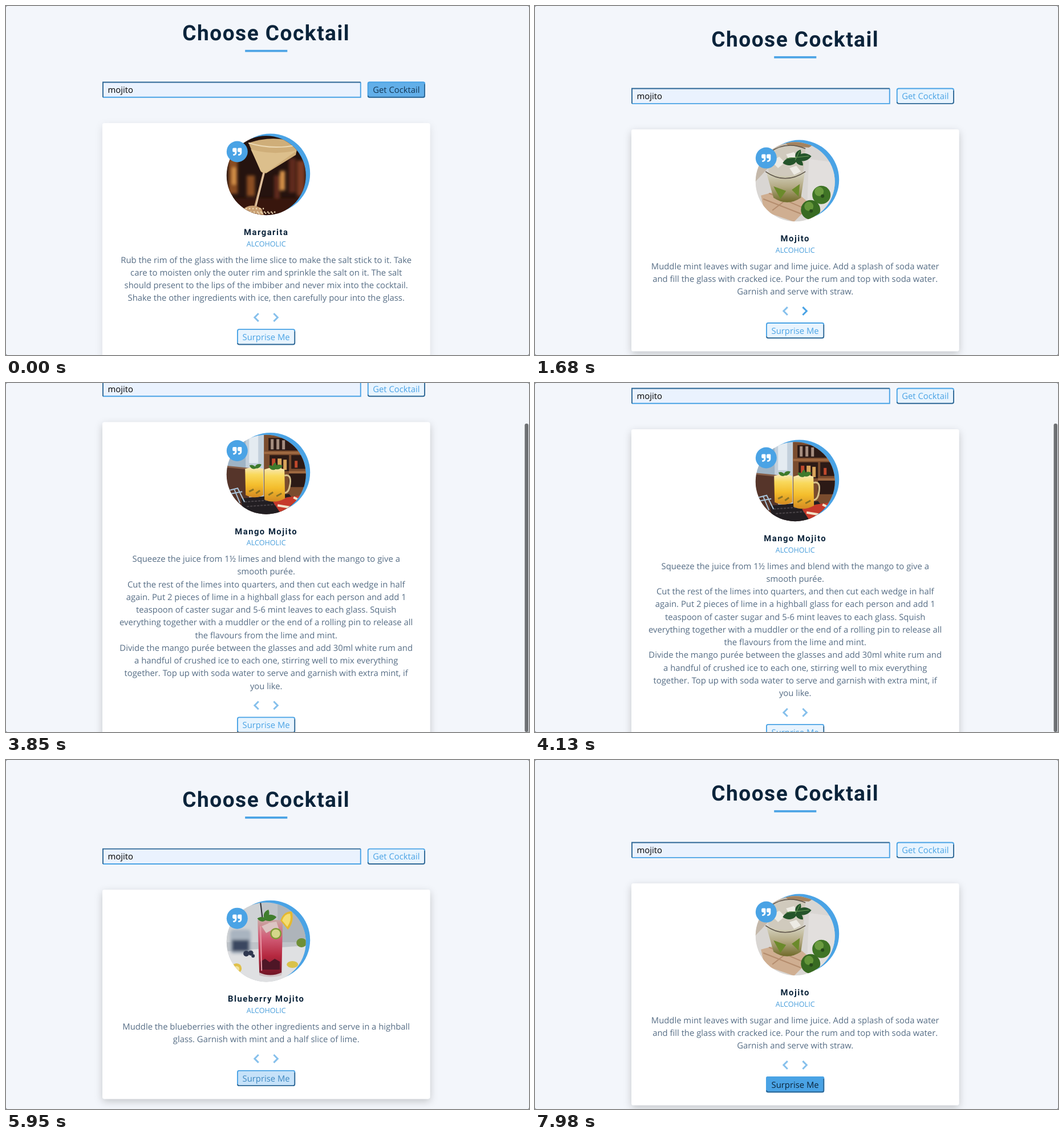
Recreate the animation shown at these times as an HTML page. Size 917 px wide and 611 px high, loop 8 s.

```html
<!DOCTYPE html>
<html lang="en">
<head>
<meta charset="utf-8">
<title>Choose Cocktail</title>
<style>
html, body { margin: 0; width: 100%; height: 100%; overflow: hidden; background: #f3f6fb; }
svg { display: block; width: 917px; height: 611px; }
text { font: 14.83px "Open Sans", sans-serif; white-space: pre; text-rendering: geometricPrecision; }
.mid { text-anchor: middle; }
.head { font-family: Roboto, sans-serif; font-weight: 700; letter-spacing: 1.48px; fill: #0b243b; }
.big { font-size: 37.06px; }
.kind { font-size: 12.6px; fill: #4a9fdc; }
.info { fill: #566d85; }
.line { fill: none; stroke-width: 1.9; }
.lite { stroke: #4aa3e5; }
.dark { stroke: #2d6795; }
.chev { fill: none; stroke: #86c0ec; stroke-width: 3; }
</style>
</head>
<body>
<svg viewBox="0 0 917 611">
  <defs>
    <clipPath id="disc"><circle r="69.5"/></clipPath>
    <filter id="shade" x="-10%" y="-10%" width="120%" height="120%">
      <feDropShadow id="drop" dx="0" dy="4.6" stdDeviation="6.9" flood-color="#000" flood-opacity=".1"/>
    </filter>
    <filter id="soft"><feGaussianBlur stdDeviation="2.5"/></filter>
    <linearGradient id="mango" x2="0" y2="1">
      <stop stop-color="#f8e9bd"/><stop offset=".25" stop-color="#f9d95c"/>
      <stop offset=".6" stop-color="#f4bd2c"/><stop offset="1" stop-color="#d38a22"/>
    </linearGradient>
    <linearGradient id="berry" x2="0" y2="1">
      <stop stop-color="#c9a9a4"/><stop offset=".3" stop-color="#d2607a"/>
      <stop offset=".65" stop-color="#b5283f"/><stop offset="1" stop-color="#6d1424"/>
    </linearGradient>
    <linearGradient id="lime" x2="0" y2="1">
      <stop stop-color="#d9d7c6"/><stop offset=".5" stop-color="#b3a983"/><stop offset="1" stop-color="#6f6a28"/>
    </linearGradient>
    <path id="leaf" d="M0 0C3-9 14-11 22-4C16 4 7 5 0 0Z"/>
    <path id="mark" d="M6 0H2A2 2 0 0 0 0 2V5.5A2 2 0 0 0 2 7.3H4.1V8.6A1.9 1.9 0 0 1 2.2 10.7H1.7A.8.8 0 0 0 1 11.5V12.7A.8.8 0 0 0 1.8 13.5A5.2 5.2 0 0 0 7.2 8.5V1.6A1.6 1.6 0 0 0 6 0Z"/>
  </defs>
  <rect width="917" height="611" fill="#7d858e"/>
  <rect width="917" height="611" rx="3" fill="#f3f6fb"/>

  <g id="page">
    <text class="mid head big" x="456.2" y="60.3">Choose Cocktail</text>
    <rect x="419.2" y="76.8" width="74.1" height="3.7" fill="#4aa3e5"/>
    <g id="field"></g>
    <text x="178.4" y="152.2">mojito</text>
    <g id="get"></g>
    <rect id="card" x="169" y="204.9" width="574.5" height="410" rx="3.7" fill="#fff" filter="url(#shade)"/>
    <circle cx="463.7" cy="293" r="69.5" fill="#4aa3e5"/>
    <g transform="translate(456.2 296.7)" clip-path="url(#disc)">
      <g class="photo">
        <rect x="-70" y="-70" width="140" height="140" fill="#25130f"/>
        <g filter="url(#soft)">
          <path d="M-66-30h16v62h-16zM-34 0h14v36h-14z" fill="#8a4d22"/>
          <path d="M-60-14h7v30h-7zM24-8h9v34h-9z" fill="#d69248"/>
          <path d="M14 0h10v44h-10zM40-30h12v60h-12z" fill="#5e2a1b"/>
          <path d="M54-26h14v62h-14z" fill="#7c3a24"/>
          <path d="M-70 40h140v30h-140z" fill="#38190f"/>
        </g>
        <path d="M-31-57Q12-72 56-57L52-36L0-4Q-8-4-10-8Z" fill="#cfae79"/>
        <path d="M-27-46Q12-34 54-44L0-5Q-8-5-10-9Z" fill="#dcbf8c"/>
        <path d="M-31-57Q12-44 56-54" fill="none" stroke="#ecd9b4" stroke-width="2"/>
        <path d="M-4-5Q-12 26-19 54" fill="none" stroke="#c9a27a" stroke-width="4"/>
        <path d="M-4-5Q-11 26-18 54" fill="none" stroke="#f2dfc4" stroke-width="1.2"/>
        <path d="M-44 62Q-28 46-8 58L-4 70H-44Z" fill="#c99f72"/>
        <path d="M-36 58h34M-28 64h44M-14 66h30" stroke="#f0dcb8" stroke-width="2.5" stroke-dasharray="2 4"/>
      </g>
      <g class="photo">
        <rect x="-70" y="-70" width="140" height="140" fill="#d9d6d3"/>
        <path d="M-70-70H20L-14-60L-70 0Z" fill="#c4b8aa"/>
        <path d="M-20-70H40L24-60L-10-62Z" fill="#a5835f"/>
        <path d="M24-40L70-34V70H20Z" fill="#e2dfdd"/>
        <path d="M-60 24L-8 10L28 40L-2 70L-54 52Z" fill="#cfae91"/>
        <path d="M-56 30L10 56M-46 20L20 48M-40 50L4 16" stroke="#b58d6e" stroke-width="2"/>
        <path d="M-52-46Q-20-74 18-58L10 28Q-14 44-38 28Z" fill="#d0cabd"/>
        <path d="M-51-18Q-18-2 17-18L10 28Q-14 44-38 28Z" fill="url(#lime)"/>
        <path d="M-38 8L-16 16L-26 30ZM-6 14L8 4L6 26Z" fill="#6b8a2b"/>
        <path d="M-42-36l14-8 10 10-12 10zM-16-48l14-4 8 12-14 6zM-10-24l12-4 8 10-12 6z" fill="#edebe4"/>
        <path d="M-52-18Q-18 6 18-18M-52-46Q-20-74 18-58" fill="none" stroke="#5e554a" stroke-width="1.6"/>
        <g fill="#24542a">
          <use href="#leaf" transform="translate(2 -40) scale(1.2)"/>
          <use href="#leaf" transform="translate(4 -40) rotate(175) scale(1.2)"/>
          <use href="#leaf" transform="translate(2 -40) rotate(-55) scale(.8)"/>
          <use href="#leaf" transform="translate(0 -40) rotate(50) scale(.8)"/>
        </g>
        <path d="M-16-41L24-45M0-38L8-54" stroke="#6fa05b"/>
        <circle cx="46" cy="23" r="16" fill="#3f7426"/><circle cx="42" cy="17" r="8" fill="#6b9c40"/>
        <circle cx="27" cy="49" r="17" fill="#386b22"/><circle cx="24" cy="43" r="8" fill="#649639"/>
        <circle cx="48" cy="25" r="3" fill="#26491a"/><circle cx="28" cy="51" r="3" fill="#26491a"/>
      </g>
      <g class="photo">
        <rect x="-70" y="-70" width="140" height="140" fill="#c3d0dc"/>
        <path d="M-70-70h34v60h-34z" fill="#9fb4c6"/>
        <path d="M-30-70h16v50h-16z" fill="#e4ebf1"/>
        <path d="M-4-70H70V40H-4Z" fill="#7a4c2e"/>
        <path d="M4-64H64V-42H4ZM6-34H40V-6H6ZM44-34H70V-10H44ZM40-2H70V22H40Z" fill="#2c1a16"/>
        <path d="M8-62h5v18h-5zM18-62h5v18h-5zM28-60h5v16h-5z" fill="#a58d7f"/>
        <path d="M10-28h6v20h-6zM50-24h5v12h-5z" fill="#c0482c"/>
        <path d="M20-28h7v20h-7zM30-26h6v18h-6z" fill="#d8a35a"/>
        <path d="M-4-38H70M40-4H70" stroke="#a06a42" stroke-width="4"/>
        <path d="M-70-14L-30-10V40H70V70H-70Z" fill="#56352a"/>
        <path d="M-70-14L-30-10" stroke="#87604b" stroke-width="3"/>
        <path d="M-44 42L40 34L70 70H-40Z" fill="#221e22"/>
        <path d="M-38 48L48 42M-34 56L54 50" stroke="#4a4448" stroke-width="2" stroke-dasharray="4 2"/>
        <path d="M-66 28L-50 24L-38 48M-56 26L-46 50M-64 34L-42 30" fill="none" stroke="#a9c3d8" stroke-width="2"/>
        <path d="M12 48L36 40L64 36L56 56L24 66Z" fill="#c63a2b"/>
        <path d="M20 54L44 58M48 40l8 4" stroke="#f3e3c8" stroke-width="4"/>
        <path d="M32 2q12-4 10 14t-12 16" fill="none" stroke="#d6c08c" stroke-width="3"/>
        <path d="M-37-10Q-21-16-5-10V36Q-20 44-36 36Z" fill="url(#mango)"/>
        <path d="M-3-9Q14-16 32-9L33 42Q14 52-3 44Z" fill="url(#mango)"/>
        <path d="M-30 30l8-4M-18 33l7-5M4 36l8-5M18 38l9-5" stroke="#8d7424" stroke-width="3"/>
        <g fill="#3e7a2c">
          <use href="#leaf" transform="translate(-20 -11) rotate(-20) scale(.6)"/>
          <use href="#leaf" transform="translate(-18 -11) rotate(215) scale(.55)"/>
          <use href="#leaf" transform="translate(14 -10) rotate(-10) scale(.7)"/>
          <use href="#leaf" transform="translate(16 -9) rotate(220) scale(.6)"/>
          <use href="#leaf" transform="translate(14 -8) rotate(-70) scale(.6)"/>
        </g>
      </g>
      <g class="photo">
        <rect x="-70" y="-70" width="140" height="140" fill="#bfc3c8"/>
        <path d="M-70-70H-10V0H-70Z" fill="#cfd2d5"/>
        <path d="M20-70H70V0H20Z" fill="#aeb4ba"/>
        <path d="M-70 16L70 6V70H-70Z" fill="#dfe0e2"/>
        <g filter="url(#soft)">
          <rect x="-63" y="-22" width="36" height="42" rx="6" fill="#a9b4c0"/>
          <path d="M-60-4h30v20h-30z" fill="#3b4760"/>
        </g>
        <g fill="#2f3850"><circle cx="-35" cy="20" r="5"/><circle cx="-27" cy="19" r="4.5"/><circle cx="-23" cy="24" r="3"/></g>
        <ellipse cx="62" cy="1" rx="9" ry="8" fill="#6f8f36"/>
        <circle cx="-52" cy="46" r="9" fill="#e0c04a"/><circle cx="-52" cy="47" r="5" fill="#f1e199"/>
        <ellipse cx="46" cy="39" rx="10" ry="6" fill="#d9c24a"/>
        <path d="M-10-69L-5-30" stroke="#2b2e33" stroke-width="2"/>
        <path d="M-15-39H29L27 55Q7 63-12 55Z" fill="url(#berry)"/>
        <path d="M-8-28l14-6 8 10-14 8zM4-34l14-2 4 12-12 2z" fill="#dcc4c2"/>
        <path d="M-10 34l8-5 8 6 9-6 9 5v14h-34z" fill="#4e1626"/>
        <path d="M-12 53Q7 62 27 53V58Q7 64-12 58Z" fill="#cfc0c3"/>
        <path d="M-10-28L-8 50" stroke="#e89aa7" stroke-width="2"/>
        <circle cx="17" cy="-15" r="10" fill="#7f9a36"/><circle cx="17" cy="-15" r="7.5" fill="#d4d88a"/>
        <path d="M25-38Q30-54 45-54Q50-36 38-22Z" fill="#e5b92f"/>
        <path d="M28-38Q32-50 42-50Q45-38 37-27Z" fill="#f4dd73"/>
        <g fill="#3f7d2d">
          <use href="#leaf" transform="translate(-4 -40)"/>
          <use href="#leaf" transform="translate(0 -40) rotate(195) scale(.7)"/>
          <use href="#leaf" transform="translate(-2 -40) rotate(-60) scale(.8)"/>
        </g>
      </g>
    </g>
    <circle cx="405.3" cy="255" r="18.5" fill="#4aa3e5"/>
    <g fill="#fff"><use href="#mark" x="397.2" y="248.4"/><use href="#mark" x="406.1" y="248.4"/></g>
    <g id="copy"></g>
    <text class="mid kind" x="456.2" y="420.6">ALCOHOLIC</text>
    <g id="foot">
      <path class="chev" d="M442.8 538.3L435.9 545.2L442.8 552.1"/>
      <path class="chev" id="next" d="M469.4 538.3L476.3 545.2L469.4 552.1"/>
      <g id="lucky"></g>
    </g>
  </g>
  <rect id="bar" x="909.5" width="6.5" height="540" rx="3.2" fill="#6d7073"/>
</svg>
<script>
const $ = id => document.getElementById(id);
const STEP = 22.24, LOOP = 8000, TICK = 70, MAX = 85.3;

const drinks = [
  { name: "Margarita", top: 0, lines: [
    "Rub the rim of the glass with the lime slice to make the salt stick to it. Take",
    "care to moisten only the outer rim and sprinkle the salt on it. The salt",
    "should present to the lips of the imbiber and never mix into the cocktail.",
    "Shake the other ingredients with ice, then carefully pour into the glass."] },
  { name: "Mojito", top: 11.1, lines: [
    "Muddle mint leaves with sugar and lime juice. Add a splash of soda water",
    "and fill the glass with cracked ice. Pour the rum and top with soda water.",
    "Garnish and serve with straw."] },
  { name: "Mango Mojito", top: -35.1, lines: [
    "Squeeze the juice from 1½ limes and blend with the mango to give a",
    "smooth purée.",
    "Cut the rest of the limes into quarters, and then cut each wedge in half",
    "again. Put 2 pieces of lime in a highball glass for each person and add 1",
    "teaspoon of caster sugar and 5-6 mint leaves to each glass. Squish",
    "everything together with a muddler or the end of a rolling pin to release all",
    "the flavours from the lime and mint.",
    "Divide the mango purée between the glasses and add 30ml white rum and",
    "a handful of crushed ice to each one, stirring well to mix everything",
    "together. Top up with soda water to serve and garnish with extra mint, if",
    "you like."] },
  { name: "Blueberry Mojito", top: 22.2, lines: [
    "Muddle the blueberries with the other ingredients and serve in a highball",
    "glass. Garnish with mint and a half slice of lime."] }
];
// start time and drink index
const cuts = [[0, 0], [350, 1], [2030, 3], [3010, 2], [5250, 3], [7070, 1]];

const ramp = (t, a, b) => Math.min(1, Math.max(0, (t - a) / (b - a)));
const mix = (a, b, k) => `rgb(${a.map((v, i) => Math.round(v + (b[i] - v) * k))})`;
const PALE = [232, 244, 254], BLUE = [74, 163, 229], NAVY = [11, 36, 59], SKY = [134, 192, 236];

// box with a two-tone edge: a colours top and left, b colours bottom and right
function bevel(x, y, w, h, r, a, b) {
  const l = x + .95, u = y + .95, e = x + w - .95, d = y + h - .95;
  return `<rect x="${x}" y="${y}" width="${w}" height="${h}" rx="${r}" fill="#eaf2fe"/>
    <path class="line ${b}" d="M${l} ${d - r}q0 ${r} ${r} ${r}H${e - r}q${r} 0 ${r} ${-r}V${u + r}"/>
    <path class="line ${a}" d="M${l} ${d - r}V${u + r}q0 ${-r} ${r} ${-r}H${e - r}q${r} 0 ${r} ${r}"/>`;
}
function button(id, x, y, w, label) {
  $(id).innerHTML = bevel(x, y, w, 28.2, 3, "lite", "dark") +
    `<text class="mid" x="${x + w / 2}" y="${y + 19.7}">${label}</text>`;
}
function hover(id, k) {
  $(id).querySelector("rect").style.fill = mix(PALE, BLUE, k);
  $(id).querySelector("text").style.fill = mix(BLUE, NAVY, k);
}

$("field").innerHTML = bevel(169, 132.5, 453.7, 28.2, 0, "dark", "lite");
button("get", 633.8, 132.5, 101.2, "Get Cocktail");
button("lucky", 405, 565.2, 102.2, "Surprise Me");
$("copy").innerHTML = drinks.map(d => `<g><text class="mid head" x="456.2" y="401.2">${d.name}</text>` +
  d.lines.map((s, i) => `<text class="mid info" x="456.2" y="${449.7 + i * STEP}">${s}</text>`).join("") +
  "</g>").join("");
const photos = [...document.querySelectorAll(".photo")], copies = [...$("copy").children];

// quick flick past the end, then a springy return
function scroll(t) {
  if (t < 3850) return 101.4 * Math.sin(ramp(t, 3640, 3850) * Math.PI / 2) ** 1.5;
  if (t < 3920) return 101.4;
  return MAX + 16.1 * Math.exp(-(t - 3920) / 140);
}

function draw(now) {
  const t = Math.floor(now % LOOP / TICK) * TICK;
  const pick = cuts.filter(c => c[0] <= t).pop()[1];
  const d = drinks[pick], grow = (d.lines.length - 4) * STEP;
  const shift = pick === 2 ? scroll(t) : 0;

  photos.forEach((p, i) => p.style.display = i === pick ? "" : "none");
  copies.forEach((c, i) => c.style.display = i === pick ? "" : "none");
  $("page").setAttribute("transform", `translate(0 ${d.top - shift})`);
  $("foot").setAttribute("transform", `translate(0 ${grow})`);
  $("card").setAttribute("height", 410.6 + grow);
  $("drop").setAttribute("flood-opacity", .1 + .1 * ramp(t, 1120, 1420));

  hover("get", ramp(t, -255, 45) - ramp(t, 660, 960));
  hover("lucky", ramp(t, 5885, 6185));
  const k = ramp(t, 1370, 1670) - ramp(t, 3010, 3150) + ramp(t, 4340, 4620) - ramp(t, 5250, 5550);
  $("next").style.stroke = mix(SKY, BLUE, k);

  $("bar").setAttribute("y", 71 * Math.min(1, shift / MAX));
  $("bar").style.opacity = ramp(t, 3640, 3710) - ramp(t, 4480, 4620);
}

function loop() {
  draw(performance.now());
  requestAnimationFrame(loop);
}
loop();
</script>
</body>
</html>
```
